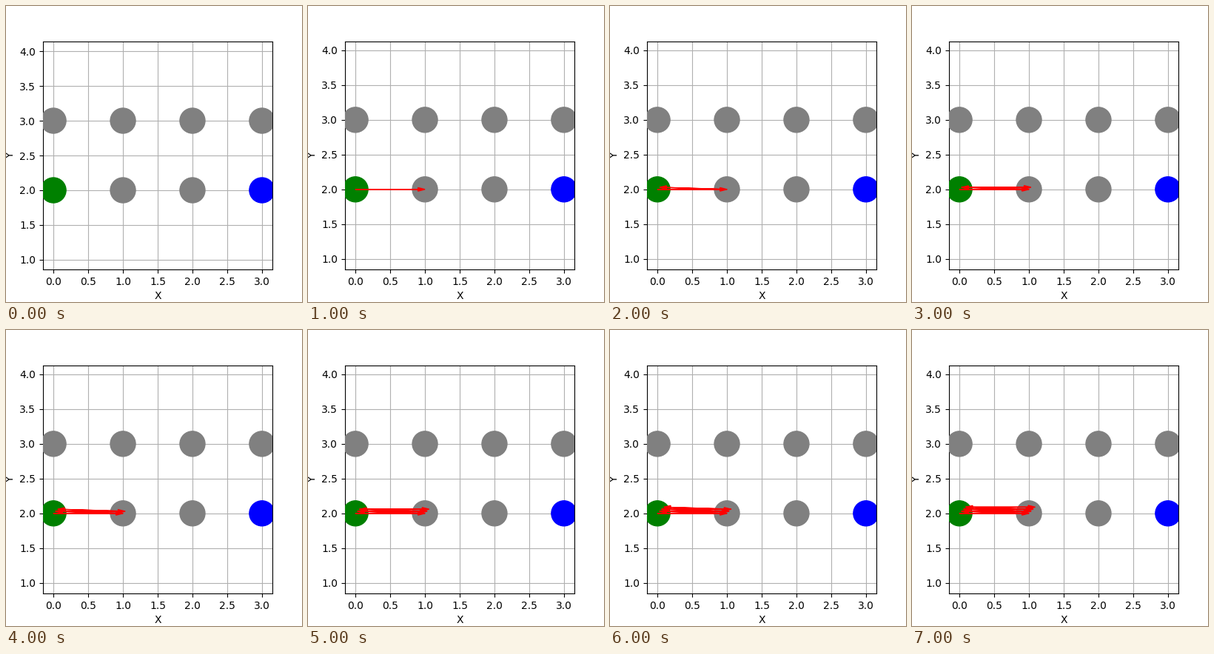
Write a matplotlib script that moves like this. It is 400x400 px and loops after 8000 ms.

```python
import matplotlib.pyplot as plt
from matplotlib.animation import FuncAnimation

STEPS = 8
OFFSET = 0.03  # shift added after every round trip
HALF_X = 1.65
HALF_Y = HALF_X * 308 / 310  # equal scale on both axes
HEAD = 0.05

fig, ax = plt.subplots(figsize=(4, 4), dpi=100)


def position(step):
    """Agent swings between two cells, drifting with each return."""
    drift = OFFSET * (step // 2)
    return step % 2 + drift, 2 + drift


def add_arrow(step):
    x0, y0 = position(step - 1)
    x1, y1 = position(step)
    return ax.arrow(x0, y0, x1 - x0, y1 - y0, head_width=HEAD, head_length=0.1,
                    length_includes_head=True, fc="red", ec="red", zorder=4)


cells = [(x, y) for y in (2, 3) for x in range(4)]
special = {(0, 2): "green", (3, 2): "blue"}
colors = [special.get(cell, "gray") for cell in cells]
ax.scatter(*zip(*cells), s=600, c=colors, zorder=3)

ax.grid(True)
ax.set_xlabel("X")
ax.set_ylabel("Y")
arrows = [add_arrow(step) for step in range(1, STEPS)]
ax.set_xlim(1.5 - HALF_X, 1.5 + HALF_X)


def update(step):
    for i, arrow in enumerate(arrows):
        arrow.set_visible(i < step)
    # the first arrow head widens the data range downwards
    center = 2.5 - (HEAD / 4 if step else 0)
    ax.set_ylim(center - HALF_Y, center + HALF_Y)
    return arrows


anim = FuncAnimation(fig, update, frames=STEPS, interval=1000, repeat=True)
plt.show()
```
